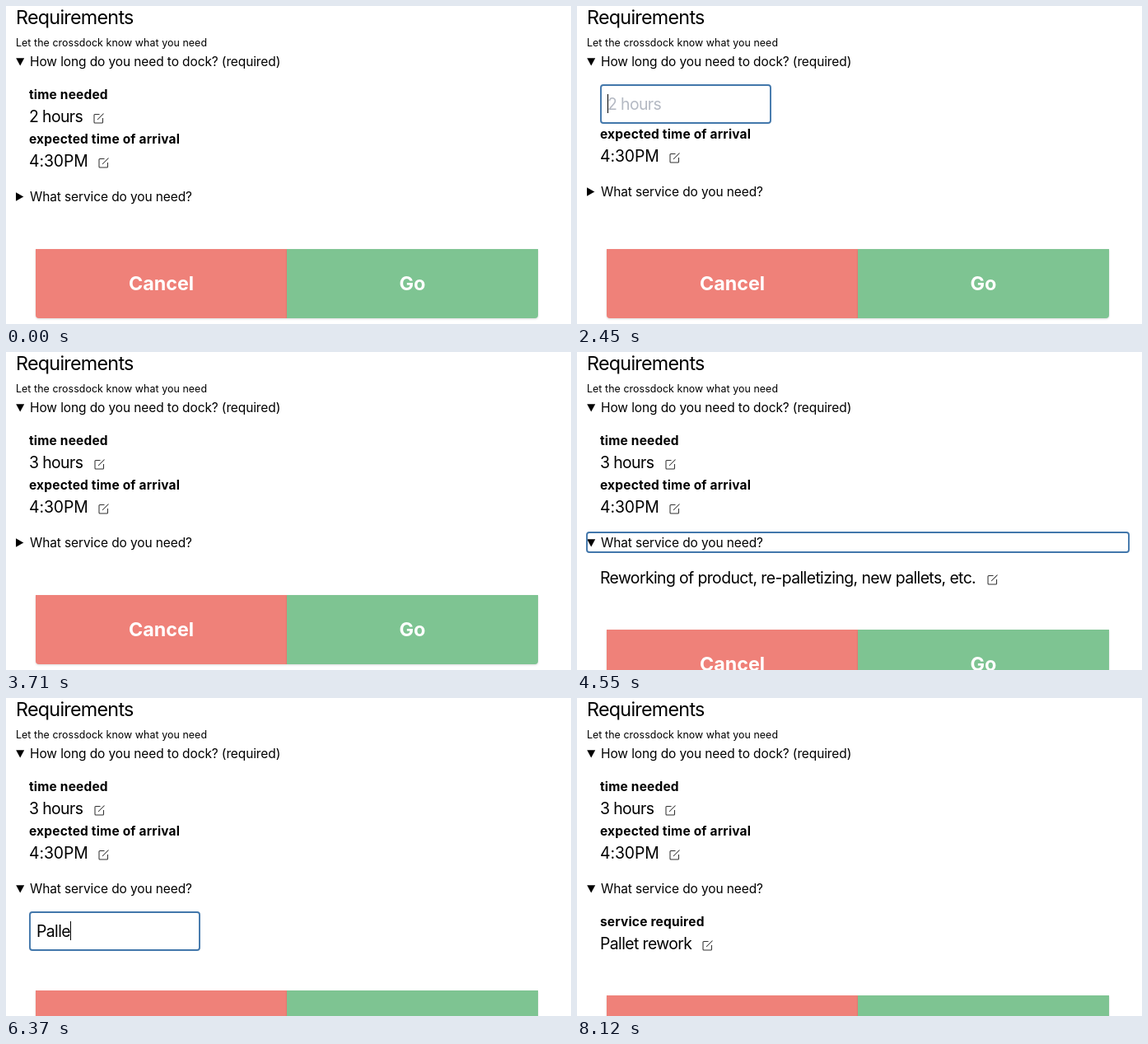
An HTML page that plays this animation: 686 px wide and 386 px high, repeating every 8.47 s.

```html
<!DOCTYPE html>
<html lang="en">
<head>
<meta charset="utf-8">
<title>Requirements form</title>
<style>
  html, body { margin: 0; width: 100%; height: 100%; overflow: hidden; background: #fff; }
  svg { display: block; font-family: Inter, Roboto, sans-serif; font-optical-sizing: none; }
  text { white-space: pre; }
  .title { font-size: 23.3px; letter-spacing: -.031em; }
  .small { font-size: 12.4px; letter-spacing: .07px; }
  .summary { font-size: 15.5px; letter-spacing: -.007em; }
  .label { font-size: 15.5px; font-weight: 700; letter-spacing: .18px; }
  .value { font-size: 19.4px; letter-spacing: -.031em; }
  .time { letter-spacing: -.005em; }
  .button { filter: drop-shadow(0 1px 1px rgb(0 0 0 / .15)); }
  .caption { font-size: 23.3px; font-weight: 700; fill: #fff; text-anchor: middle; }
  .ring { fill: none; stroke: #4277ab; stroke-width: 1.9; }
</style>
</head>
<body>
<svg width="686" height="386" viewBox="0 0 686 386">
  <defs>
    <path id="edit" d="M7.500 2.500H2Q1 2.500 1 3.500V12Q1 13 2 13H10.500Q11.500 13 11.500 12V7M5 9L12.500 1.500"
      fill="none" stroke="#333" stroke-width="1.05" stroke-linejoin="round"/>
    <path id="open" d="M12.200 63.200H22.200L17.200 72.500Z"/>
    <clipPath id="field"><rect x="36" y="100" width="191.500" height="40"/></clipPath>
  </defs>

  <text class="title" x="12" y="22">Requirements</text>
  <text class="small" x="12" y="49">Let the crossdock know what you need</text>
  <use href="#open"/>
  <text class="summary" x="29" y="73">How long do you need to dock? (required)</text>

  <g id="duration">
    <text class="label" x="28" y="113">time needed</text>
    <text class="value" x="28" y="141" id="hours"></text>
    <use href="#edit" y="129" id="hoursEdit"/>
  </g>

  <g id="lower">
    <text class="label" x="28" y="167">expected time of arrival</text>
    <text class="value time" x="28" y="195">4:30PM</text>
    <use href="#edit" x="112" y="183"/>
    <text class="summary" x="29" y="237">What service do you need?</text>
    <path id="closed" d="M12 226.300L21.300 231.500L12 236.700Z"/>
    <use href="#open" y="164" id="opened"/>
  </g>
  <rect class="ring" id="focus" x="12" y="219" width="658" height="24" rx="3"/>

  <g id="hint">
    <text class="value" x="28" y="281">Reworking of product, re-palletizing, new pallets, etc.</text>
    <use href="#edit" x="498" y="269"/>
  </g>
  <g id="service">
    <text class="label" x="28" y="277">service required</text>
    <text class="value" x="28" y="305">Pallet rework</text>
    <use href="#edit" x="152" y="293"/>
  </g>

  <g id="input">
    <rect class="ring" x="29" y="96" width="206" height="46" rx="3"/>
    <g clip-path="url(#field)"><text class="value" x="37" y="126" id="entry"></text></g>
    <rect id="caret" y="107" width="1" height="23"/>
  </g>

  <g id="buttons">
    <path class="button" fill="#ef8179" d="M36 295H341V379H40Q36 379 36 375Z"/>
    <path class="button" fill="#7ec492" d="M341 295H646V375Q646 379 642 379H341Z"/>
    <text class="caption" x="188.500" y="345">Cancel</text>
    <text class="caption" x="493.500" y="345">Go</text>
  </g>
</svg>
<script>
const LOOP = 8470, TICK = 70;
const el = id => document.getElementById(id);
const show = (id, on) => el(id).style.display = on ? '' : 'none';
const moveY = (id, y) => el(id).setAttribute('transform', `translate(0 ${y})`);

// Part of the text typed by time t, one letter per step
const typed = (text, t, start, step) =>
  text.slice(0, Math.max(0, Math.floor((t - start) / step) + 1));

function durationEntry(t) {
  if (t < 2380) return '2 hours';
  if (t < 2450) return '2 ';
  return typed('3 hours', t, 3010, 100);
}

function serviceEntry(t) {
  if (t < 6580) return typed('Pallet', t, 5530, 196);
  if (t < 7070) return 'Pallet' + typed(' wo', t, 6580, 105);
  if (t < 7140) return 'Pallet w';
  return 'Pallet ' + typed('rework', t, 7210, 126);
}

function drawInput(value, placeholder, caretOn) {
  const entry = el('entry');
  entry.textContent = value;
  el('caret').setAttribute('x', 37 + (value ? entry.getComputedTextLength() : 0));
  show('caret', caretOn);
  entry.textContent = value || placeholder;
  entry.setAttribute('fill', value ? '#000' : '#b4b9c3');
}

function render(t) {
  const editDuration = t >= 1400 && t < 3710;
  const expanded = t >= 4550;
  const editService = t >= 5250 && t < 8120;
  const done = t >= 8120;

  show('duration', !editDuration);
  el('hours').textContent = t < 3710 ? '2 hours' : '3 hours';
  el('hoursEdit').setAttribute('x', t < 3710 ? 106 : 107);
  moveY('lower', editDuration ? -6 : 0);

  show('closed', !expanded);
  show('opened', expanded);
  show('focus', expanded && t < 5110);
  show('hint', expanded && t < 5250);
  show('service', done);

  show('input', editDuration || editService);
  moveY('input', editService ? 164 : 0);
  if (editDuration) drawInput(durationEntry(t), '2 hours', t < 1960 || t >= 2380);
  if (editService) drawInput(serviceEntry(t), 'Reworking of product, re-palletizing', true);

  moveY('buttons', done ? 66 : editService ? 60 : expanded ? 42 : 0);
}

const begin = performance.now();
function loop() {
  const t = (performance.now() - begin) % LOOP;
  render(Math.floor(t / TICK) * TICK);
  requestAnimationFrame(loop);
}
loop();
</script>
</body>
</html>
```
